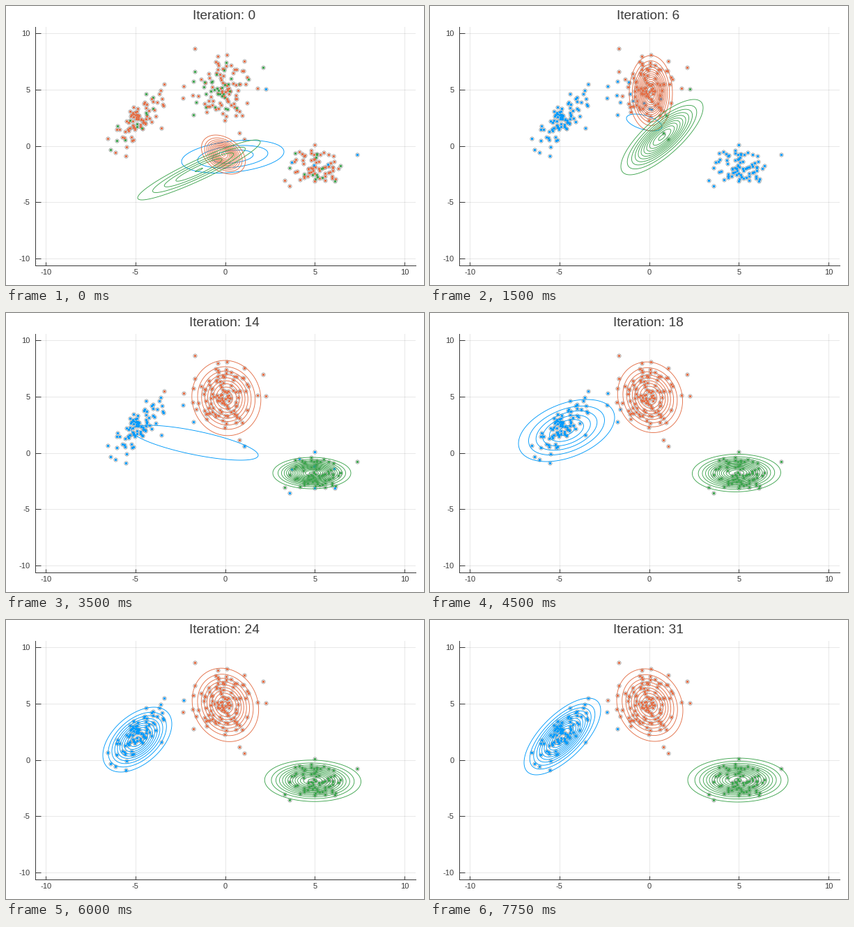
A matplotlib script for the animation above (8 s loop, 600 by 400 pixels).

```python
import numpy as np
import matplotlib.pyplot as plt
from matplotlib.animation import FuncAnimation
from matplotlib.collections import LineCollection

W, H, DPI = 600, 400, 100
FRAMES, INTERVAL = 32, 250
PX = 72 / DPI  # one pixel in points
COLORS = np.array(["#009AFA", "#E36F47", "#3EA44E"])
INK = "#3a3a3a"
LIM = 10.6
BOX = (41.7, 371.7, 546, 342)  # left, bottom, width, height in pixels
UX, UY = BOX[2] / (2 * LIM), BOX[3] / (2 * LIM)

plt.rcParams["font.family"] = "Liberation Sans"
plt.rcParams["axes.unicode_minus"] = False

# Key poses: iteration, centre x, centre y, half width, half height
# of the outer ring (pixels), correlation, peak in contour levels
BLUE = np.array([
    (0, 325.5, 216, 73.5, 23.5, .3, 3.7),
    (6, 307.5, 167, 25.5, 12, -.5, 1.1),
    (10, 305, 194.5, 170, 46.5, -.8, 2.54),
    (14, 271, 186, 91, 25, -.72, 1.6),
    (18, 196, 168.5, 69, 44.5, .42, 6.3),
    (24, 188.5, 171.5, 49.5, 46.5, .48, 11.2),
    (31, 190, 167, 55, 55, .68, 12.3),
])
ORANGE = np.array([
    (0, 312, 213, 31.5, 28, -.35, 13.2),
    (6, 317, 125, 31, 54, 0, 14.2),
    (10, 316.5, 119.5, 49.5, 52.5, 0, 9.3),
    (31, 315.5, 122, 47.5, 52, -.15, 10.2),
])
GREEN = np.array([
    (0, 277, 235, 88, 43, .93, 5.03),
    (2, 285, 260, 90, 115, .6, 4.2),
    (6, 333, 188, 59, 54, .78, 11.2),
    (9, 352, 194, 62, 48, .5, 9),
    (10, 422.5, 224, 107.5, 31, -.63, 14.2),
    (14, 439, 229.5, 56, 22.5, 0, 16.2),
    (31, 442, 229.5, 72, 31.5, 0, 14.2),
])
COMPONENTS = (BLUE, ORANGE, GREEN)

# Points far from their cluster, in pixels
STRAYS = [
    (271, 61), (254, 132), (255, 115), (269, 156), (335, 182), (342, 191),
    (373, 119), (369, 88), (227, 112), (223, 175), (146, 190), (150, 206),
    (172, 215), (443, 199), (504, 213), (407, 258), (400, 250),
]


def to_data(x, y):
    return (x - BOX[0]) / UX - LIM, (BOX[1] - y) / UY - LIM


def cluster(rng, count, centre, spread, rho):
    """Correlated normal cloud, cut off at about two deviations."""
    u, v = rng.normal(size=(2, count * 3))
    near = np.flatnonzero(np.hypot(u, v) < 2.15)[:count]
    u, v = u[near], v[near]
    tilted = rho * u + np.sqrt(1 - rho**2) * v
    return np.column_stack([centre[0] + spread[0] * u,
                            centre[1] - spread[1] * tilted])


def make_points():
    rng = np.random.default_rng(7)
    px = np.vstack([
        STRAYS,
        cluster(rng, 110, (315, 117), (23, 24), 0),
        cluster(rng, 82, (189, 166), (18, 22), .7),
        cluster(rng, 76, (445, 231), (20, 12), -.15),
    ])
    px = np.rint(px) + .5  # centre every marker on a pixel
    return np.column_stack(to_data(*px.T))


def pose(keys, i):
    """Quick move from key to key that settles, plus a small wobble."""
    k = min(np.searchsorted(keys[:, 0], i, side="right"), len(keys) - 1)
    a, b = keys[k - 1], keys[k]
    t = (i - a[0]) / (b[0] - a[0])
    cx, cy, hx, hy, rho, peak = (a + (b - a) * (1 - (1 - t)**3))[1:]
    if 0 < t < 1:
        rng = np.random.default_rng(1000 + i + int(keys[0, 1]))
        e = rng.uniform(-1, 1, 5)
        cx, cy = cx + 1.5 * e[0], cy + 1.5 * e[1]
        hx, hy = hx * (1 + .04 * e[2]), hy * (1 + .04 * e[3])
        rho = np.clip(rho + .05 * e[4], -.95, .95)
    x, y = to_data(cx, cy)
    return x, y, hx / UX, hy / UY, rho, peak


def contours(x, y, hx, hy, rho, peak):
    t = np.linspace(0, 2 * np.pi, 121)
    ex, ey = hx * np.cos(t), hy * np.sin(t + np.arcsin(rho))
    segs = []
    for level in range(1, int(peak) + 1):
        r = np.sqrt(np.log(peak / level) / np.log(peak))
        yy = y + r * ey
        segs.append(np.column_stack([x + r * ex, np.where(yy < -10, np.nan, yy)]))
    return segs


def log_density(x, y, hx, hy, rho, peak):
    s = np.sqrt(2 * np.log(peak))
    u, v = (points[:, 0] - x) * s / hx, (points[:, 1] - y) * s / hy
    return np.log(peak) - (u * u + v * v - 2 * rho * u * v) / (2 * (1 - rho**2))


def labels(i):
    """Sample each point's component from the previous pose."""
    if i == 0:
        logp = np.tile(np.log([.015, .80, .185]), (len(points), 1))
    else:
        logp = np.column_stack([log_density(*pose(k, i - 1)) for k in COMPONENTS])
    noise = np.random.default_rng(50 + i).gumbel(size=logp.shape)
    return np.argmax(logp + noise, axis=1)


def markers(size, **style):
    # One colour per point keeps the drawing free of snapping.
    return ax.scatter(*points.T, s=(size * PX)**2, c=["white"] * len(points),
                      zorder=3, snap=False, **style)


points = make_points()

fig = plt.figure(figsize=(W / DPI, H / DPI), dpi=DPI, facecolor="white")
ax = fig.add_axes([BOX[0] / W, 1 - BOX[1] / H, BOX[2] / W, BOX[3] / H])
ax.set(xlim=(-LIM, LIM), ylim=(-LIM, LIM),
       xticks=range(-10, 11, 5), yticks=range(-10, 11, 5))
ax.set_axisbelow(True)
ax.grid(color="black", alpha=.09, lw=PX)
ax.spines[["top", "right"]].set_visible(False)
ax.spines[["left", "bottom"]].set(color=INK, linewidth=PX)
ax.tick_params(direction="in", labelsize=8, color=INK, labelcolor=INK, width=PX)
ax.tick_params(axis="x", length=5 * PX, pad=5 * PX)
ax.tick_params(axis="y", length=8 * PX, pad=7 * PX)
title = fig.text(313 / W, 1 - 19 / H, "", fontsize=13.8, color=INK,
                 ha="center", va="baseline")

markers(5.4, edgecolors="0.6", linewidths=.7 * PX)
dots = markers(3.5, linewidths=0)
rings = [ax.add_collection(LineCollection([], colors=c, linewidths=.9 * PX, zorder=4),
                           autolim=False) for c in COLORS]


def update(i):
    title.set_text(f"Iteration: {i}")
    dots.set_facecolor(COLORS[labels(i)])
    for ring, keys in zip(rings, COMPONENTS):
        ring.set_segments(contours(*pose(keys, i)))
    return [title, dots, *rings]


anim = FuncAnimation(fig, update, frames=FRAMES, interval=INTERVAL,
                     init_func=lambda: update(0), repeat=True, repeat_delay=0)
plt.show()
```
